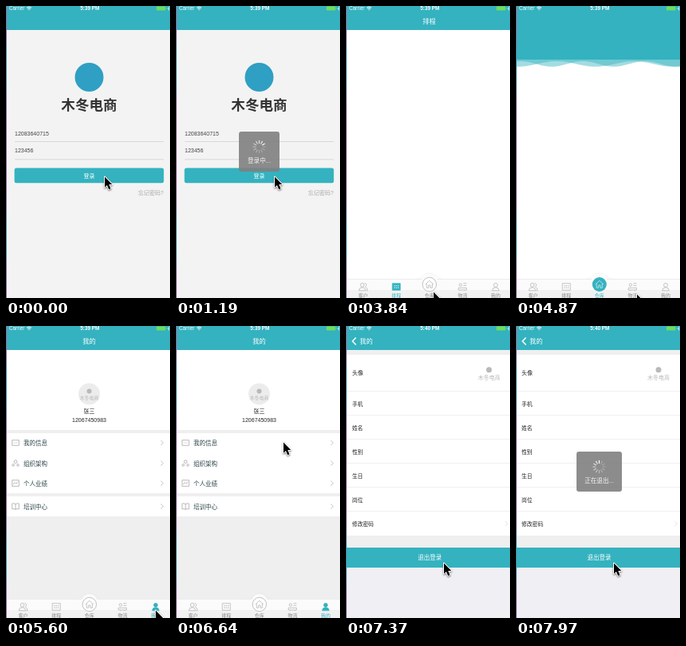
These frames come from a looping animation (206 px wide and 365 px high, 8 s). An HTML page with a canvas:

```html
<!DOCTYPE html>
<html lang="zh-CN">
<head>
<meta charset="utf-8">
<title>App walkthrough</title>
<style>
html, body { margin: 0; width: 100%; height: 100%; overflow: hidden; background: #fff; }
canvas { display: block; width: 206px; height: 365px; }
</style>
</head>
<body>
<canvas id="stage"></canvas>
<script>
const W = 206, H = 365, LOOP = 8000;
const TEAL = '#34b2bf', GREY = '#efefef', LINE = '#dedede';
const FONT = '"Liberation Sans", "Noto Sans CJK SC", "Noto Sans CJK", sans-serif';
const BRAND = '木冬电商';

const canvas = document.getElementById('stage');
const ratio = window.devicePixelRatio || 1;
canvas.width = W * ratio;
canvas.height = H * ratio;
const c = canvas.getContext('2d');

// The screen refreshes in bursts: [first, last, steps]
const bursts = [[140, 1040, 7], [1190, 2220, 8], [2820, 3840, 8], [3990, 5020, 8],
  [5170, 6200, 8], [6340, 7370, 8], [7670, 7970, 3]];

// Pointer stops: [time, x, y]
const stops = [[0, 123, 212], [2700, 123, 212], [3260, 66, 352], [3500, 66, 352],
  [3840, 109, 356], [4150, 109, 356], [4720, 151, 359], [5030, 151, 359],
  [5400, 187, 354], [5600, 187, 354], [6600, 134, 144], [6950, 134, 144],
  [7360, 122, 295], [LOOP, 122, 295]];

function snap(t) {
  let shown = 0;
  for (const [first, last, steps] of bursts) {
    if (t < first) break;
    const gap = (last - first) / (steps - 1);
    shown = first + gap * Math.min(steps - 1, Math.floor((t - first + 4) / gap));
  }
  return shown;
}

function rect(x, y, w, h, color, radius = 0) {
  c.fillStyle = color;
  c.beginPath();
  c.roundRect(x, y, w, h, radius);
  c.fill();
}

function disc(x, y, r, color) {
  c.fillStyle = color;
  c.beginPath();
  c.arc(x, y, r, 0, 7);
  c.fill();
}

function text(s, x, y, size, color, align = 'left', weight = 400) {
  c.font = `${weight} ${size}px ${FONT}`;
  c.textAlign = align;
  c.textBaseline = 'middle';
  c.fillStyle = color;
  c.fillText(s, x, y + 0.3 + size * 0.05);
}

function icon(d, x, y, stroke, fill, width = 0.8, scale = 1) {
  const path = new Path2D(d);
  c.save();
  c.translate(x, y);
  c.scale(scale, scale);
  c.lineWidth = width;
  c.lineJoin = 'round';
  if (fill) { c.fillStyle = fill; c.fill(path); }
  if (stroke) { c.strokeStyle = stroke; c.stroke(path); }
  c.restore();
}

const chevron = (x, y, color = '#b5b5b5') => icon('M-1.5 -3L1.5 0L-1.5 3', x, y, color);

const PERSON = 'M-2.6 -2.2a2.6 2.6 0 1 0 5.2 0a2.6 2.6 0 1 0 -5.2 0zM-4.6 5Q-4.4 .9 0 .9Q4.4 .9 4.6 5z';
const HOUSE = 'M-6 0L0 -5.5L6 0M-4.2 -1V5H-1.3V1.2H1.3V5H4.2V-1';

const tabs = [
  ['客户', 'M-3.6 -2.3a2.4 2.6 0 1 0 4.8 0a2.4 2.6 0 1 0 -4.8 0zM-5.8 5Q-5.5 .8 -1.2 .8Q3 .8 3.3 5zM2 -4.8a2.3 2.5 0 0 1 .7 4.8Q5.6 1 5.8 5H4.3'],
  ['排程', 'M-5.3 -4.5H5.3V4.5H-5.3z', 'M-3 -1.4h1.4m1 0h1.4m1 0h1.4M-3 1.2h1.4m1 0h1.4m1 0h1.4'],
  ['仓库'],
  ['物流', 'M-4.5 -2.5a1.8 1.8 0 1 0 3.6 0a1.8 1.8 0 1 0 -3.6 0zM1 -4.5H5.3M1 -1.7H5.3M-5.5 4.2V1.4H5.3V4.2zM-3 4.2v1M3 4.2v1'],
  ['我的', PERSON],
];

function tabBar(active) {
  rect(0, 341, W, 14, '#fbfbfb');
  rect(0, 341, W, 0.6, LINE);
  icon('M-16 5.5Q-11 5 -9 0A10 10 0 0 1 9 0Q11 5 16 5.5V19H-16z', 104.8, 341, null, '#fbfbfb');
  icon('M-16 .3Q-12 0 -9 -3A12 12 0 0 1 9 -3Q12 0 16 .3', 104.8, 341, '#e8e8e8', null, 0.6);
  rect(0, 355, W, 10, '#f1f1f1');
  tabs.forEach(([label, shape, detail], i) => {
    const x = 21.6 + i * 41.6, on = i === active, color = on ? TEAL : '#aaa';
    if (shape) {
      icon(shape, x, 351, color, on ? TEAL : null, 0.7, 0.95);
      if (detail) icon(detail, x, 351, on ? '#fff' : color, null, 1, 0.95);
    } else {
      disc(x, 348, 9, on ? TEAL : '#fff');
      if (!on) icon('M-8.7 0a8.7 8.7 0 1 0 17.4 0a8.7 8.7 0 1 0 -17.4 0z', x, 348, '#b0b0b0');
      icon(HOUSE, x, 348, on ? '#e4f5f7' : '#a8a8a8', null, 0.8, 0.85);
    }
    text(label, x, 362, 6, on ? TEAL : '#888', 'center');
  });
}

function header(title) {
  rect(0, 0, W, 30, TEAL);
  if (title) text(title, 104.5, 19.4, 8.3, '#fff', 'center');
}

function statusBar(t) {
  text('Carrier', 4, 3, 6.3, '#fff');
  icon('M-3 -1Q0 -3.6 3 -1M-1.8 .4Q0 -1.2 1.8 .4M-.5 1.7h1', 29, 3.2, '#fff', null, 1);
  text(t < 7200 ? '5:39 PM' : '5:40 PM', 105.3, 3, 6.4, '#fff', 'center', 700);
  rect(189, 0.6, 11.3, 5, '#6fdc5c', 0.8);
  rect(200.7, 2.2, 0.8, 1.8, '#6fdc5c');
  icon('M1 -2.5L-1 .4H.8L0 2.6', 204.3, 3, '#fff', null, 0.7);
}

function loginPage() {
  rect(0, 0, W, H, '#f3f3f3');
  header();
  disc(104.5, 89, 18, '#2f9fc4');
  text(BRAND, 104.5, 124, 17.6, '#333', 'center', 900);
  text('12083640715', 11, 159.7, 7, '#444');
  text('123456', 11, 180.2, 7, '#444');
  for (const y of [169, 191.5]) rect(11, y, 187, 0.7, '#cfcfcf');
  rect(10.6, 202.5, 187.6, 18.7, TEAL, 2.5);
  text('登录', 104.5, 212, 7, '#fff', 'center');
  text('忘记密码?', 198, 233, 7, '#aaa', 'right');
}

function customersPage() {
  header();
  rect(0, 30, W, 6, GREY);
  icon('M0 4.2Q-3.2 .8 -3.2 -1A3.2 3.2 0 0 1 3.2 -1Q3.2 .8 0 4.2z', 13, 19, null, '#fff');
  disc(13, 18, 1.2, TEAL);
  text('仓库345678904569', 20, 19.3, 9.6, '#fff');
  icon('M-3.8 -.5a3.4 3.4 0 1 0 6.8 0a3.4 3.4 0 1 0 -6.8 0M2 2L4.2 4.2', 167, 20, '#fff', null, 0.9);
  icon('M-4.3 0H4.3M0 -4.3V4.3', 189, 20, '#fff', null, 1);
}

function warehousePage(t) {
  rect(0, 0, W, 67.5, TEAL);
  for (const [length, crest] of [[12.4, 45], [15.5, 100]]) {
    c.fillStyle = 'rgba(52,178,191,.45)';
    c.beginPath();
    c.moveTo(0, 67.5);
    for (let x = 0; x <= W; x += 2) {
      c.lineTo(x, 72.4 + 3.4 * Math.cos((x - crest) / length + (t - 4870) / 260));
    }
    c.lineTo(W, 67.5);
    c.fill();
  }
}

function smallLogo(x, y, size) {
  disc(x, y - size * 1.4, size * 0.5, '#b9b9b9');
  text(BRAND, x, y, size, '#b9b9b9', 'center');
}

const profileRows = [
  ['我的信息', 146, 'M-4.5 -3.5h9v7h-9zM-2.6 0h1m1 0h1m1 0h1'],
  ['组织架构', 171.5, 'M-2 -2a2 2 0 1 0 4 0a2 2 0 1 0 -4 0M-4.5 2.5a1.4 1.4 0 1 0 2.8 0a1.4 1.4 0 1 0 -2.8 0M1.7 2.5a1.4 1.4 0 1 0 2.8 0a1.4 1.4 0 1 0 -2.8 0'],
  ['个人业绩', 196.5, 'M-4.5 -4h9v8h-9zM-3 1.5L-1 -1L.8 .8L3 -2'],
  ['培训中心', 225.5, 'M0 -3Q-2 -4.4 -4.5 -3.7V3.5Q-2 2.8 0 4Q2 2.8 4.5 3.5V-3.7Q2 -4.4 0 -3V4'],
];

function profilePage(pressed) {
  rect(0, 30, W, H - 30, GREY);
  rect(0, 30, W, 100, '#fff');
  rect(0, 134, W, 75, '#fff');
  rect(0, 213, W, 25, '#fff');
  if (pressed) rect(0, 134, W, 25, '#dadada');
  disc(104.5, 85, 13.5, '#ececec');
  smallLogo(104.5, 90, 6);
  text('张三', 104.5, 106.3, 7, '#222', 'center');
  text('12067450983', 104.5, 117.5, 7, '#222', 'center');
  for (const [label, y, shape] of profileRows) {
    icon(shape, 12, y, '#999', null, 0.7, 0.95);
    text(label, 22, y + 0.4, 7.5, '#2c4448');
    chevron(196, y);
  }
}

function infoPage() {
  rect(0, 30, W, H - 30, '#efeff4');
  rect(0, 30, W, 6, GREY);
  rect(0, 36, W, 226, '#fff');
  rect(0, 262, W, 15, GREY);
  text('头像', 7, 58.5, 7, '#222');
  smallLogo(179, 64.5, 7);
  ['手机', '姓名', '性别', '生日', '岗位', '修改密码'].forEach((label, i) => {
    rect(0, 81 + i * 30, W, 0.6, '#e2e2e2');
    text(label, 7, 97 + i * 30, 6.8, '#222');
  });
  chevron(201, 247, '#dcdcdc');
  rect(0, 277, W, 25, TEAL);
  text('退出登录', 104.5, 289.5, 7.5, '#fff', 'center');
}

function pushInfo(t) {
  const left = Math.exp(-(t - 6640) / 126), done = 1 - left;
  c.save();
  c.translate(-0.3 * W * done, 0);
  profilePage(true);
  c.restore();
  rect(0, 30, W, H - 30, `rgba(0,0,0,${0.1 * done})`);
  c.save();
  c.translate(W * left, 0);
  infoPage();
  c.restore();
  header();
  c.globalAlpha = Math.max(0, 1 - 7.5 * left);
  icon('M2.2 -4.5L-2.2 0L2.2 4.5', 10.3, 19, '#fff', null, 1.5);
  text('我的', 17 + 80 * left, 19.2, 8.2, '#fff');
  c.globalAlpha = 1;
}

function hud(t, label, width, alpha = 1) {
  c.globalAlpha = alpha;
  rect(104.5 - width / 2, 157, width, 50, 'rgba(128,128,128,.9)', 3);
  const head = Math.floor(t / 83);
  for (let i = 0; i < 12; i++) {
    c.save();
    c.translate(104.5, 176);
    c.rotate(i * Math.PI / 6);
    const age = (head - i + 1200) % 12;
    rect(-0.6, -8.3, 1.2, 4.3, `rgba(255,255,255,${Math.max(0.25, 0.95 - age * 0.09)})`, 0.6);
    c.restore();
  }
  text(label, 104.5, 193, 7.6, '#f5f5f5', 'center');
  c.globalAlpha = 1;
}

function pointer(t) {
  const i = stops.findIndex(stop => stop[0] > t);
  const [t0, x0, y0] = stops[i - 1], [t1, x1, y1] = stops[i];
  const p = (t - t0) / (t1 - t0), k = p * p * (3 - 2 * p);
  const x = x0 + (x1 - x0) * k + 1, y = y0 + (y1 - y0) * k + 1.5;
  const arrow = 'M0 0V14.6L3.3 11.6L5.8 17.4L8.4 16.3L5.9 10.6H10.4z';
  c.save();
  c.shadowColor = 'rgba(0,0,0,.5)';
  c.shadowBlur = 2 * ratio;
  c.shadowOffsetY = 0.8 * ratio;
  icon(arrow, x, y, '#fff', '#fff', 2.2, 0.9);
  c.restore();
  icon(arrow, x, y, null, '#000', 0, 0.9);
}

// Sliver of the desktop along the left side
function edge() {
  const g = c.createLinearGradient(0, 0, 0, H), shades = [...'ppbbpppppbbpp'];
  shades.forEach((s, i) => g.addColorStop(i / (shades.length - 1), s === 'p' ? '#976f9f' : '#4f97b2'));
  rect(0, 0, 1, H, g);
}

function draw(t) {
  c.setTransform(ratio, 0, 0, ratio, 0, 0);
  rect(0, 0, W, H, '#fff');
  if (t < 1900) {
    loginPage();
  } else if (t < 3400) {
    customersPage();
    tabBar(0);
  } else if (t < 4100) {
    header('排程');
    tabBar(1);
  } else if (t < 5000) {
    warehousePage(t);
    tabBar(2);
  } else if (t < 5450) {
    header('物流');
    tabBar(3);
  } else if (t < 6700) {
    header('我的');
    profilePage(false);
    tabBar(4);
  } else {
    pushInfo(t);
  }
  statusBar(t);
  if (t >= 140 && t < 2200) hud(t, '登录中...', 51, Math.min(1, (2220 - t) / 320));
  if (t >= 7600) hud(t, '正在退出...', 57);
  edge();
  pointer(t);
}

const start = performance.now();
function tick() {
  draw(snap((performance.now() - start) % LOOP));
  requestAnimationFrame(tick);
}
tick();
</script>
</body>
</html>
```
